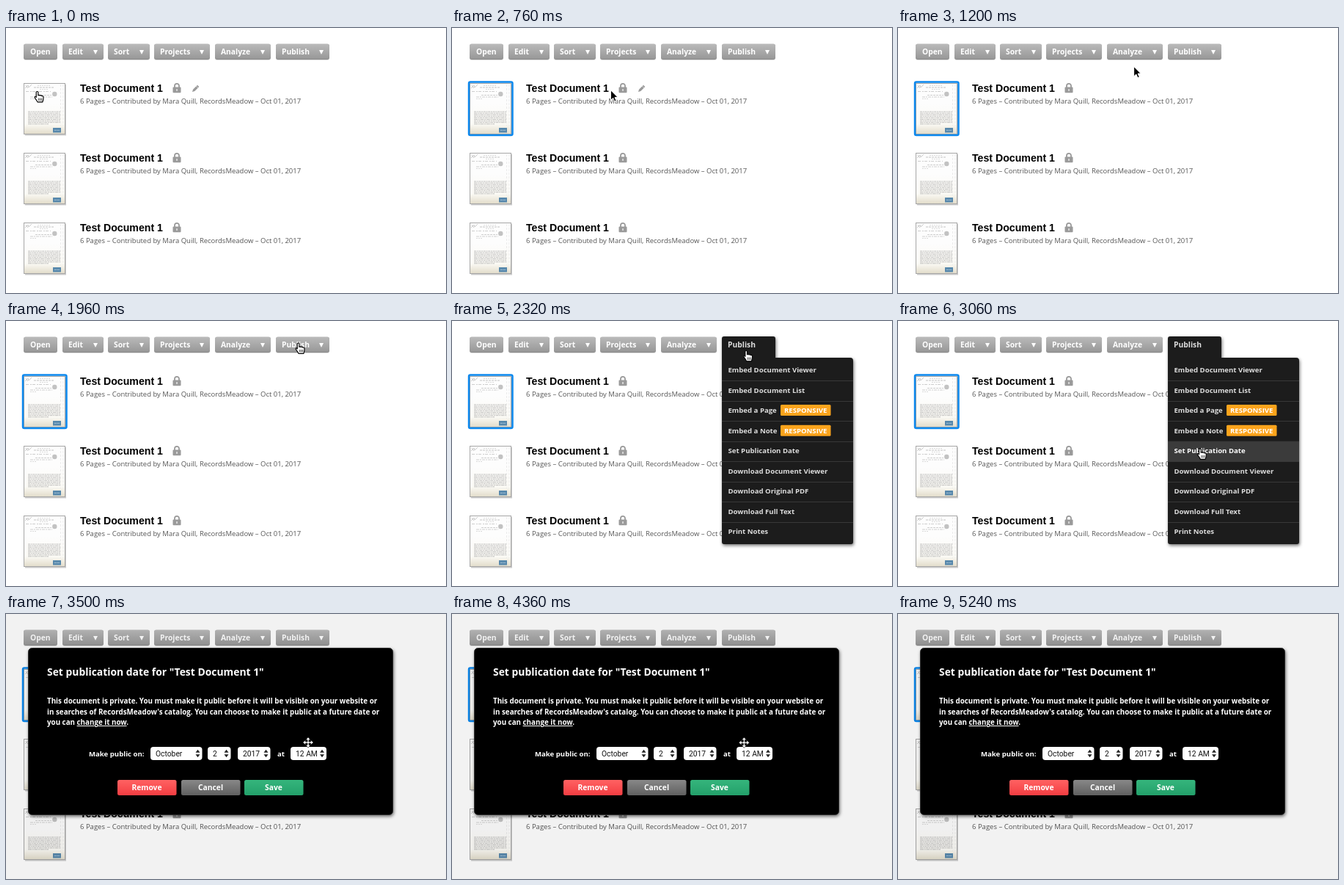
Animation, 600 px wide and 361 px high, one loop 5.28 s. Source, as an HTML page:

```html
<!DOCTYPE html>
<html lang="en">
<head>
<meta charset="utf-8">
<title>Set publication date</title>
<style>
  html, body { margin: 0; width: 600px; height: 361px; overflow: hidden; background: #fff; }
  svg { display: block; }
  text { font-family: "Open Sans", "Noto Sans", sans-serif; font-weight: 700; white-space: pre; }
  .title { font: 700 14.15px "Liberation Sans", Arial, sans-serif; fill: #000; }
  .meta { font-size: 9.5px; font-weight: 400; fill: #555; }
  .button { font-size: 10.3px; fill: #fff; }
  .heading { font-size: 13.9px; fill: #fff; }
  .note { font-size: 9.8px; fill: #fff; }
  .item { font-size: 9.6px; fill: #ddd; }
  .option { font: 400 10.3px Roboto, "Liberation Sans", sans-serif; fill: #111; }
</style>
</head>
<body>
<svg id="stage" width="600" height="361" viewBox="0 0 600 361"></svg>
<script>
const LOOP = 5280;
const ROW = 95;
const MENU_TOP = 53.5;
const ITEM = 27.55;

const text = (x, y, cls, str, extra = '') =>
  `<text x="${x}" y="${y}" class="${cls}" ${extra}>${str}</text>`;
const rect = (x, y, w, h, fill, extra = '') =>
  `<rect x="${x}" y="${y}" width="${w}" height="${h}" fill="${fill}" ${extra}/>`;
const path = (d, extra) => `<path d="${d}" ${extra}/>`;
const gradient = (id, ...stops) =>
  `<linearGradient id="${id}" x2="0" y2="1">${stops.map((c, i) =>
    `<stop offset="${i / (stops.length - 1)}" stop-color="${c}"/>`).join('')}</linearGradient>`;
const range = (n, draw) => Array.from({ length: n }, (_, i) => draw(i)).join('');

function toolButton([label, x, w]) {
  const plain = label === 'Open';
  const arrow = plain ? '' : path(`M${x + w - 14} 30h6l-3 6z`, 'fill="#fff"');
  return rect(x, 23, w, 21, '#ddd', 'rx="3"')
    + rect(x, 22, w, 21, '#8a8a8a', 'rx="3"')
    + rect(x, 21.5, w, 20.5, 'url(#gray)', 'rx="3"')
    + text(x + (plain ? 9 : 8), 36, 'button', label) + arrow;
}

// Miniature of a typed, stamped page
function thumbnail() {
  const dash = (x, y, w, color, pattern) =>
    path(`M${x} ${y}h${w}`, `stroke="${color}" stroke-width=".7" stroke-dasharray="${pattern}"`);
  return rect(26, 77, 56, 69.5, '#ccc') + rect(24.5, 75.5, 56, 69, 'url(#paper)', 'stroke="#a6a6a6"')
    + path('M26 82l4-4 1 3 4-4M27 78l3 4', 'fill="none" stroke="#bbb" stroke-width=".8"')
    + dash(43, 78.5, 18, '#ccc', '2 1') + dash(38, 81, 27, '#aaa', '3 1') + dash(46, 83.5, 12, '#ccc', '2 1')
    + dash(27, 86.5, 34, '#bbb', '4 2 2 1') + dash(40, 91.5, 22, '#bbb', '3 1')
    + dash(33, 94, 30, '#bbb', '4 1 2 1') + dash(33, 96.5, 8, '#ccc', '2 1')
    + '<circle cx="66.3" cy="90" r="3.2" fill="#c2c2c2"/>'
    + path('M74.5 77v56M78 77v56', 'stroke="#e2e2e2" stroke-width=".7" stroke-dasharray="3 2"')
    + range(9, i => dash(30, 114 + i * 2.1, i === 8 ? 28 : 44, '#a4a4a4', `${3 + i % 3} .7 2 .7`))
    + rect(64, 136, 11, 6.5, '#5788ac') + dash(66, 139.3, 7, '#d5e2ec', '2 .6');
}

function documentRow(i) {
  return `<g transform="translate(0 ${i * ROW})">${thumbnail()}
    ${text(101, 87, 'title', 'Test Document 1')}
    ${text(101, 103, 'meta', '6 Pages – Contributed by Mara Quill, RecordsMeadow – Oct 01, 2017')}
    ${rect(227.5, 80.5, 11, 7.8, '#9a9a9a', 'rx="1"')}
    ${path('M230 81v-2.2a3 3 0 0 1 6 0V81', 'fill="none" stroke="#9a9a9a" stroke-width="1.8"')}
    ${path('M233 83v3', 'stroke="#e6e6e6" stroke-width="1.5"')}</g>`;
}

function menu() {
  const items = ['Embed Document Viewer', 'Embed Document List', 'Embed a Page', 'Embed a Note',
    'Set Publication Date', 'Download Document Viewer', 'Download Original PDF',
    'Download Full Text', 'Print Notes'];
  const badge = i => rect(448, 59 + i * ITEM, 68.5, 15, '#fca41c', 'rx="1.5"')
    + text(482.2, 70.3 + i * ITEM, 'item', 'RESPONSIVE', 'text-anchor="middle" style="fill:#fff"');
  return path('M368 24q0-3 3-3h67q3 0 3 3v26h102q4 0 4 4v247q0 3-3 3H371q-3 0-3-3z',
      'fill="#1c1c1c" filter="url(#shadow)"')
    + text(376, 36, 'button', 'Publish', 'style="fill:#ddd"')
    + rect(368, 0, 179, ITEM, '#3b3b3b', 'id="hover"')
    + range(8, i => rect(368, Math.round(MENU_TOP + (i + 1) * ITEM), 179, 1, '#383838'))
    + items.map((s, i) => text(376.5, 70 + i * ITEM, 'item', s, `id="item${i}"`)).join('')
    + badge(2) + badge(3);
}

function select([label, x, w]) {
  const cx = x + w - 6;
  return rect(x, 181, w, 18, '#fff', 'rx="4"') + text(x + 7, 194, 'option', label)
    + path(`M${cx - 3} 188.7l3-4 3 4zM${cx - 3} 191.3l3 4 3-4z`, 'fill="#222"');
}

function dialogButton([label, x, fill]) {
  return rect(x, 226, 80.5, 21, `url(#${fill})`, 'rx="2.5"')
    + text(x + 40, 240.3, 'button', label, 'text-anchor="middle"');
}

function dialog() {
  return rect(0, 0, 600, 361, '#000', 'opacity=".05"')
    + rect(30.5, 46.5, 497, 227, '#000', 'rx="5" stroke="#2b2b2b" filter="url(#shadow)"')
    + text(56, 84, 'heading', 'Set publication date for "Test Document 1"')
    + text(56, 122, 'note', 'This document is private. You must make it public before it will be visible on your website or')
    + text(56, 136.5, 'note', "in searches of RecordsMeadow's catalog. You can choose to make it public at a future date or")
    + text(56, 151, 'note', 'you can <tspan text-decoration="underline">change it now</tspan>.')
    + text(113, 194, 'item', 'Make public on:', 'style="fill:#fff"')
    + text(370, 194, 'item', 'at', 'style="fill:#fff"')
    + [['October', 197, 70.5], ['2', 275, 31.5], ['2017', 316, 44.5], ['12 AM', 388, 49]].map(select).join('')
    + [['Remove', 152, 'red'], ['Cancel', 239, 'mid'], ['Save', 325, 'green']].map(dialogButton).join('');
}

function cursors() {
  const hand = `<g transform="scale(.9)">${
    path('M-2 1.5Q-2 0-.5 0T1 1.5V6Q2.5 4.6 3.6 6.2 5.4 5 6.3 6.8 8.6 6.2 8.8 8.2V11Q8.6 13.5 7.5 16H0Q-1 13.5-3.6 10.3-5 8-3.4 7.5-2.4 7.6-1.9 8.8z',
      'fill="#fff" stroke="#000" stroke-width="1.3" stroke-linejoin="round"')
    + path('M1.8 10v4M4 10v4M6.2 10v4', 'stroke="#000" stroke-width=".8"')}</g>`;
  const arrow = path('M0 0V13.5L3.2 10.6 5.3 15.4 7.6 14.4 5.5 9.7H9.6z',
    'fill="#000" stroke="#fff" stroke-width="1" stroke-linejoin="round"');
  const move = [0, 90, 180, 270].map(a =>
    path('M0-7.2L3.2-3.6H1V-1H-1V-3.6H-3.2z',
      `transform="rotate(${a})" fill="#fff" stroke="#000" stroke-width=".6"`)).join('')
    + rect(-1.2, -1.2, 2.4, 2.4, '#fff');
  return Object.entries({ hand, arrow, move }).map(([id, art]) => `<g id="${id}">${art}</g>`).join('');
}

const tools = [['Open', 24, 46], ['Edit', 77, 56], ['Sort', 139, 57], ['Projects', 202, 76],
  ['Analyze', 285, 76], ['Publish', 368, 73]];

document.getElementById('stage').innerHTML = `<defs>
  ${gradient('gray', '#bababa', '#989898')}${gradient('mid', '#888', '#606060')}
  ${gradient('red', '#ff6262', '#f33d42')}${gradient('green', '#35b57c', '#23a06a')}
  ${gradient('paper', '#fdfdfd', '#fdfdfd', '#fdfdfd', '#fcfbf8', '#fbfaf5', '#e2dcca')}
  <filter id="shadow" x="-10%" y="-10%" width="120%" height="120%">
    <feDropShadow dx="1" dy="2" stdDeviation="2.2" flood-opacity=".55"/></filter></defs>
  ${rect(0, 0, 600, 361, '#fff')}
  ${tools.map(toolButton).join('')}
  ${range(3, documentRow)}
  ${rect(23, 73.5, 59.5, 72.5, 'none', 'id="selection" rx="2" stroke="#0b88ee" stroke-width="2.5"')}
  <g id="pencil">${path('M254 87l1-3.2 6-6 2.3 2.3-6 6z', 'fill="#999"')}
    ${path('M259.5 79.3l2.3 2.3', 'stroke="#fff" stroke-width=".7"')}</g>
  <g id="menu">${menu()}</g>
  <g id="dialog">${dialog()}</g>
  <g id="cursor">${cursors()}</g>`;

// Pointer hotspot: time, x, y
const track = [[0, 43, 86.5], [360, 43, 86.5], [460, 70, 89], [600, 140, 92], [800, 235, 83],
  [1000, 306, 61], [1140, 321, 53], [1240, 322, 52], [1400, 352, 43], [1560, 390, 32],
  [1640, 399, 30], [2260, 399, 30], [2400, 405, 54], [2660, 414, 113], [2820, 415, 148],
  [2960, 413, 171], [3100, 412, 175], [3900, 412, 175], [4340, 400, 175], [4440, 392, 176],
  [4700, 330, 177], [4960, 215, 176], [5120, 80, 174], [5220, -14, 172], [LOOP, -20, 172]];

function pointer(t) {
  const i = track.findIndex(key => key[0] > t);
  const [t0, x0, y0] = track[i - 1], [t1, x1, y1] = track[i];
  const k = (t - t0) / (t1 - t0);
  return { x: x0 + (x1 - x0) * k, y: y0 + (y1 - y0) * k };
}

const $ = id => document.getElementById(id);
const show = (id, on) => { $(id).style.display = on ? '' : 'none'; };

function render(t) {
  const { x, y } = pointer(t);
  const menuOpen = t >= 2060 && t < 3420;
  const dialogOpen = t >= 3420;
  show('selection', t >= 60);
  show('pencil', t < 900);
  show('menu', menuOpen);
  show('dialog', dialogOpen);

  // The highlight trails the pointer slightly
  const row = Math.floor((pointer(Math.max(0, t - 60)).y - MENU_TOP) / ITEM);
  show('hover', row >= 0);
  $('hover').setAttribute('y', MENU_TOP + row * ITEM);
  for (let i = 0; i < 9; i++) $('item' + i).style.fill = i === row ? '#fff' : '';

  const kind = dialogOpen ? (x < 30 ? 'arrow' : 'move')
    : x < 83 || t >= 1520 ? 'hand' : 'arrow';
  for (const id of ['hand', 'arrow', 'move']) show(id, id === kind);
  $('cursor').setAttribute('transform', `translate(${x.toFixed(2)} ${y.toFixed(2)})`);
}

const start = performance.now();
function frame() {
  render((performance.now() - start) % LOOP);
  requestAnimationFrame(frame);
}
frame();
</script>
</body>
</html>
```
